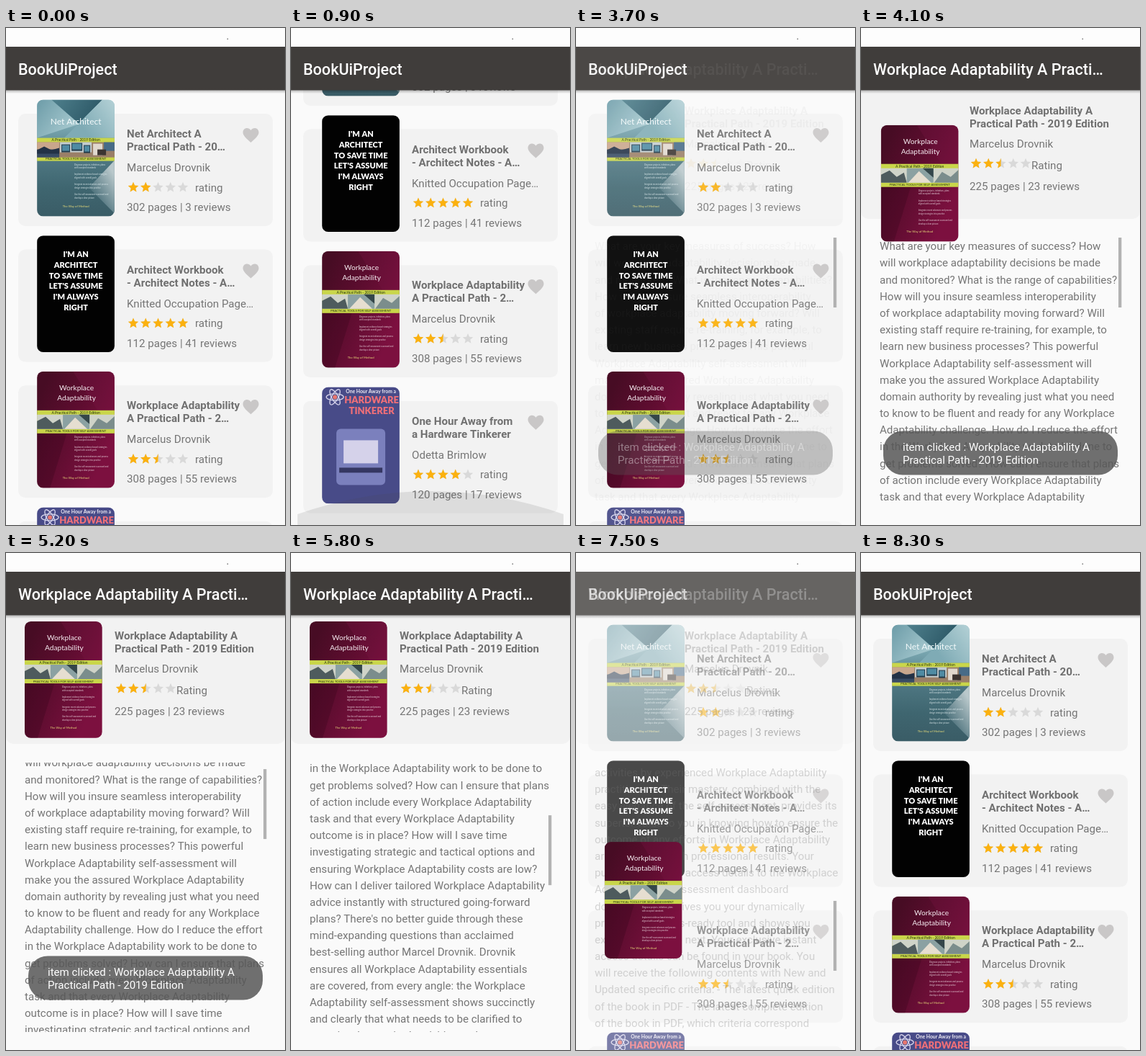
Recreate the animation shown at these times as an HTML page with a canvas. Size 388 by 690 pixels, loop 8400 ms.

```html
<!DOCTYPE html>
<html lang="en">
<head>
<meta charset="utf-8">
<title>BookUiProject</title>
<style>
html, body { margin: 0; width: 100%; height: 100%; overflow: hidden; background: #fafafa; }
canvas { display: block; }
</style>
</head>
<body>
<canvas id="stage" width="388" height="690"></canvas>
<script>
const ctx = document.getElementById('stage').getContext('2d');
const W = 388, H = 690, LOOP = 8400, TOP = 86;
const GRAY = '#757575', CARD = '#f2f2f2', PAGE = '#fafafa';
const BODY = '15.1px Roboto, sans-serif';
const BOLD = 'bold ' + BODY;
const ROW = 188.6, LINE = 23.18, SELECTED = 2;
const COVER_W = 107.8, COVER_H = 161.8;

const books = [
  { title: ['Net Architect A', 'Practical Path - 20…'], author: 'Marcelus Drovnik', stars: 2, info: '302 pages | 3 reviews', cover: tealCover },
  { title: ['Architect Workbook', '- Architect Notes - A…'], author: 'Knitted Occupation Page…', stars: 5, info: '112 pages | 41 reviews', cover: blackCover },
  { title: ['Workplace Adaptability', 'A Practical Path - 2…'], author: 'Marcelus Drovnik', stars: 2.5, info: '308 pages | 55 reviews', cover: maroonCover },
  { title: ['One Hour Away from', 'a Hardware Tinkerer'], author: 'Odetta Brimlow', stars: 4, info: '120 pages | 17 reviews', cover: blueCover }
];

const story = `What are your key measures of success? How
will workplace adaptability decisions be made
and monitored? What is the range of capabilities?
How will you insure seamless interoperability
of workplace adaptability moving forward? Will
existing staff require re-training, for example, to
learn new business processes? This powerful
Workplace Adaptability self-assessment will
make you the assured Workplace Adaptability
domain authority by revealing just what you need
to know to be fluent and ready for any Workplace
Adaptability challenge. How do I reduce the effort
in the Workplace Adaptability work to be done to
get problems solved? How can I ensure that plans
of action include every Workplace Adaptability
task and that every Workplace Adaptability
outcome is in place? How will I save time
investigating strategic and tactical options and
ensuring Workplace Adaptability costs are low?
How can I deliver tailored Workplace Adaptability
advice instantly with structured going-forward
plans? There's no better guide through these
mind-expanding questions than acclaimed
best-selling author Marcel Drovnik. Drovnik
ensures all Workplace Adaptability essentials
are covered, from every angle: the Workplace
Adaptability self-assessment shows succinctly
and clearly that what needs to be clarified to
organize the required activities and processes
so that Workplace Adaptability outcomes are
achieved. Contains extensive criteria grounded
in past and current successful projects and
activities by experienced Workplace Adaptability
practitioners. Their mastery, combined with the
easy elegance of the self-assessment, provides its
superior value to you in knowing how to ensure the
outcome of any efforts in Workplace Adaptability
are maximized with professional results. Your
purchase includes access details to the Workplace
Adaptability self-assessment dashboard
download which gives you your dynamically
prioritized projects-ready tool and shows you
exactly what to do next. Your exclusive instant
access details can be found in your book. You
will receive the following contents with New and
Updated specific criteria: - The latest quick edition
of the book in PDF - The latest complete edition
of the book in PDF, which criteria correspond
to the criteria in the dashboard and more`.split('\n');

// Keyframes as [time, value] pairs, linear in between.
const listScroll = [[400, 0], [500, 30], [800, 167], [1000, 167], [1100, 145], [1300, 40], [1400, 0]];
const bottomGlow = [[700, 0], [800, .7], [900, 1], [1100, 0]];
const topGlow = [[1300, 0], [1400, .6], [1500, 1], [1900, 0]];
const textScroll = [[5100, 0], [5200, 35], [5400, 190], [5600, 278], [5700, 278], [5800, 282], [5900, 330],
  [6000, 410], [6100, 510], [6200, 600], [6300, 665], [6400, 708], [6500, 733], [6600, 740]];
const coverMove = [[3700, 0], [4200, 1], [7000, 1], [7700, 0]];
const pageFade = [[3600, 0], [3700, .06], [4100, 1], [7000, 1], [7700, 0]];
const toastAlpha = [[3600, 0], [3700, .4], [3800, 1], [5400, 1], [5600, 0]];

function track(keys, t) {
  if (t <= keys[0][0]) return keys[0][1];
  for (let i = 1; i < keys.length; i++) {
    const [t0, v0] = keys[i - 1], [t1, v1] = keys[i];
    if (t <= t1) return v0 + (v1 - v0) * (t - t0) / (t1 - t0);
  }
  return keys[keys.length - 1][1];
}
const smooth = p => p * p * (3 - 2 * p);
const mix = (a, b, p) => a + (b - a) * p;

function scoped(draw) { ctx.save(); draw(); ctx.restore(); }
function faded(alpha, draw) { scoped(() => { ctx.globalAlpha = alpha; draw(); }); }
function rect(x, y, w, h, color) { ctx.fillStyle = color; ctx.fillRect(x, y, w, h); }
function poly(color, ...pts) {
  ctx.fillStyle = color;
  ctx.beginPath();
  for (let i = 0; i < pts.length; i += 2) ctx.lineTo(pts[i], pts[i + 1]);
  ctx.fill();
}
function roundPath(x, y, w, h, r) { ctx.beginPath(); ctx.roundRect(x, y, w, h, r); }
function round(x, y, w, h, r, color) { roundPath(x, y, w, h, r); ctx.fillStyle = color; ctx.fill(); }
function clipRect(x, y, w, h) { ctx.beginPath(); ctx.rect(x, y, w, h); ctx.clip(); }
function text(str, x, y, font = BODY, color = GRAY, align = 'left') {
  ctx.font = font; ctx.fillStyle = color; ctx.textAlign = align;
  ctx.fillText(str, x, y);
}
function gradient(x0, y0, x1, y1, ...colors) {
  const g = ctx.createLinearGradient(x0, y0, x1, y1);
  colors.forEach((c, i) => g.addColorStop(i / (colors.length - 1), c));
  return g;
}

function star(cx, cy, color) {
  const pts = [];
  for (let i = 0; i < 10; i++) {
    const a = i * Math.PI / 5 - Math.PI / 2, r = i % 2 ? 3.45 : 7.6;
    pts.push(cx + r * Math.cos(a), cy + .4 + r * Math.sin(a));
  }
  poly(color, ...pts);
}
function rating(x, y, value) {
  for (let i = 0; i < 5; i++) {
    const cx = x + i * 17.25;
    star(cx, y, '#d9d9d9');
    scoped(() => {
      clipRect(cx - 9, y - 9, 18 * Math.min(1, Math.max(0, value - i)), 18);
      star(cx, y, '#fbb10f');
    });
  }
}
function heart(cx, cy) {
  ctx.fillStyle = '#c9c7c7';
  ctx.beginPath();
  ctx.moveTo(cx, cy + 10);
  ctx.bezierCurveTo(cx - 7, cy + 4, cx - 11, cy, cx - 11, cy - 4);
  ctx.bezierCurveTo(cx - 11, cy - 11, cx - 3, cy - 12, cx, cy - 7);
  ctx.bezierCurveTo(cx + 3, cy - 12, cx + 11, cy - 11, cx + 11, cy - 4);
  ctx.bezierCurveTo(cx + 11, cy, cx + 7, cy + 4, cx, cy + 10);
  ctx.fill();
}

// Covers are drawn on a 108 x 162 area.
function guideText(y, color) {
  rect(0, y, 108, 32, '#c9d64a');
  text('A Practical Path - 2019 Edition', 54, y + 4.8, '5px Lato, sans-serif', '#243010', 'center');
  text('PRACTICAL TOOLS FOR SELF-ASSESSMENT', 54, y + 30.6, '4.2px Lato, sans-serif', '#243010', 'center');
  const lines = ['Diagnose projects, initiatives, plans', 'with accepted standards', '',
    'Implement evidence based strategies', 'aligned with overall goals', '',
    'Integrate recent advances and process', 'design strategies into practice', '',
    'Use the self-assessment scorecard and', 'develop a clear picture'];
  lines.forEach((s, i) => text(s, 52, y + 38 + i * 4.6, '2.8px Lato, sans-serif', color));
  text('The Way of Method', 54, 149, '4.2px Lato, sans-serif', '#e8dc7a', 'center');
}
function tealCover() {
  rect(0, 0, 108, 162, gradient(0, 0, 0, 162, '#9dc3ca', '#76a3ad', '#4f7883', '#3f6670', '#3a5c66'));
  poly(gradient(0, 0, 54, 40, '#6d9ca8', '#a9cbd1'), 0, 0, 20, 0, 61, 33, 0, 53);
  poly(gradient(20, 0, 70, 33, '#4f808d', '#2f5b69'), 20, 0, 91, 0, 58, 33);
  poly(gradient(60, 33, 108, 0, '#7fabb5', '#b4d1d6'), 91, 0, 108, 0, 108, 53, 38, 53);
  poly(gradient(76, 125, 108, 105, '#51757f', '#b9c8cb'), 108, 84, 108, 158, 72, 122);
  guideText(53, '#d7e5e8');
  rect(0, 59, 108, 21, '#9a7f68');
  rect(0, 59, 31, 10, '#c9a68c');
  rect(0, 69, 31, 11, '#384b64');
  poly('#233246', 0, 70, 10, 65, 20, 70, 31, 67, 31, 75, 0, 75);
  rect(32, 59, 44, 14, '#c3cdd0');
  [[34, 62, 12], [48, 60, 15], [65, 63, 9]].forEach(([x, y, w]) => {
    rect(x, y, w, 11, '#243b4a'); rect(x + 1, y + 1, w - 2, 8, '#4f8ba3');
  });
  rect(78, 61, 13, 16, '#e0d8ce');
  rect(93, 59, 15, 12, '#476b87');
  rect(84, 69, 12, 8, '#3b3431');
  text('Net Architect', 54, 34, '12px Lato, sans-serif', '#f4fafb', 'center');
}
function blackCover() {
  rect(0, 0, 108, 162, '#020202');
  ["I'M AN", 'ARCHITECT', 'TO SAVE TIME', "LET'S ASSUME", "I'M ALWAYS", 'RIGHT'].forEach((s, i) =>
    text(s, 54, 30 + i * 14.7, '900 11px Lato, sans-serif', '#fff', 'center'));
}
function maroonCover() {
  rect(0, 0, 108, 162, gradient(0, 40, 108, 90, '#470c24', '#5f0d30', '#7c103f'));
  poly('rgba(120,20,66,.3)', 50, 0, 108, 0, 108, 54, 84, 54);
  poly('rgba(45,3,22,.25)', 0, 84, 42, 84, 18, 162, 0, 162);
  guideText(54, '#e3cad5');
  rect(0, 60, 108, 20, '#cfd3c8');
  poly('#4e5b5d', 0, 80, 0, 69, 12, 63, 22, 72, 32, 66, 36, 80);
  rect(36, 60, 37, 20, '#8ba1a2');
  poly('#e6ded0', 38, 80, 53, 64, 70, 80);
  poly('#34464a', 58, 60, 73, 60, 73, 73);
  poly('#7b8d8c', 74, 80, 85, 65, 97, 72, 108, 62, 108, 80);
  text('Workplace', 55, 26, '10.2px Lato, sans-serif', '#f7edf2', 'center');
  text('Adaptability', 55, 40, '10.2px Lato, sans-serif', '#f7edf2', 'center');
}
function blueCover() {
  rect(0, 0, 108, 162, '#484b88');
  ctx.strokeStyle = '#d5d2ea';
  ctx.lineWidth = 1.3;
  for (let i = 0; i < 3; i++) {
    ctx.beginPath();
    ctx.ellipse(18, 14, 12, 4.5, i * Math.PI / 3, 0, 7);
    ctx.stroke();
  }
  ctx.beginPath(); ctx.arc(18, 14, 3, 0, 7); ctx.fillStyle = '#e8776f'; ctx.fill();
  text('One Hour Away from a', 68, 9, 'bold 6.8px Lato, sans-serif', '#f0edf5', 'center');
  text('HARDWARE', 69, 23, '900 13px Lato, sans-serif', '#ef6f78', 'center');
  text('TINKERER', 69, 38, '900 13px Lato, sans-serif', '#ef6f78', 'center');
  round(20, 58, 68, 78, 6, '#7b80bd');
  rect(30, 74, 48, 32, '#d5d2ea');
  rect(24, 112, 60, 7, '#353762');
}
function cover(book, x, y) {
  scoped(() => {
    ctx.translate(x, y);
    roundPath(0, 0, COVER_W, COVER_H, 8.6);
    ctx.clip();
    book.cover();
  });
}

function listItem(book, y, hideCover) {
  round(17, y + 119, 354, 156, 10, CARD);
  if (!hideCover) cover(book, 43.1, y + 99.6);
  book.title.forEach((s, i) => text(s, 168, y + 152 + i * 18, BOLD, '#707070'));
  text(book.author, 168, y + 199);
  rating(177, y + 221, book.stars);
  text('rating', 263, y + 226.5);
  text(book.info, 168, y + 254);
  heart(340.5, y + 149);
}
function glow(amount, bottom) {
  if (!amount) return;
  scoped(() => {
    if (bottom) { ctx.translate(0, H + TOP); ctx.scale(1, -1); }
    ctx.fillStyle = `rgba(70,70,70,${.13 * Math.sqrt(amount)})`;
    ctx.beginPath();
    ctx.moveTo(9, TOP);
    ctx.lineTo(9, TOP + 15 * amount);
    ctx.quadraticCurveTo(194, TOP + 79 * amount, 379, TOP + 15 * amount);
    ctx.lineTo(379, TOP);
    ctx.fill();
  });
}
function listPage(t, hideSelected) {
  const scroll = track(listScroll, t);
  books.forEach((b, i) => listItem(b, i * ROW - scroll, hideSelected && i === SELECTED));
  glow(track(topGlow, t), false);
  glow(track(bottomGlow, t), true);
}

function detailPage(scroll) {
  rect(0, TOP, W, H - TOP, PAGE);
  round(0, TOP, W, 179, [0, 0, 10, 10], CARD);
  text('Workplace Adaptability A', 151, 119.5, BOLD, '#707070');
  text('Practical Path - 2019 Edition', 151, 137.5, BOLD, '#707070');
  text('Marcelus Drovnik', 151, 166);
  rating(160, 188, 2.5);
  text('Rating', 237, 195.5);
  text('225 pages | 23 reviews', 151, 225);
  scoped(() => {
    clipRect(0, 291, W, 374);
    story.forEach((s, i) => text(s, 26, 308.3 + i * LINE - scroll));
  });
}

function header(fade) {
  rect(0, 0, W, 26, '#fdfdfd');
  rect(307.5, 14.5, 1.5, 1.5, '#777');
  rect(0, TOP, W, 5, gradient(0, TOP, 0, TOP + 5, 'rgba(0,0,0,.28)', 'rgba(0,0,0,0)'));
  rect(0, 26, W, 60.4, '#403d3b');
  // The bar pales a little while both pages are half transparent.
  faded(fade * (1 - fade), () => rect(0, 26, W, 60.4, PAGE));
  const font = '500 21.56px Roboto, sans-serif';
  faded(1 - fade, () => text('BookUiProject', 17, 65, font, '#fff'));
  faded(fade, () => text('Workplace Adaptability A Practi…', 17, 65, font, '#fff'));
}

function toast(alpha) {
  faded(alpha, () => {
    round(31, 559.5, 326, 61, 27, 'rgba(88,88,88,.85)');
    text('item clicked : Workplace Adaptability A', 58, 587, BODY, '#fff');
    text('Practical Path - 2019 Edition', 58, 605, BODY, '#fff');
  });
}

function render(t) {
  const move = smooth(track(coverMove, t));
  const fade = track(pageFade, t);
  const scroll = track(textScroll, t);
  rect(0, 0, W, H, PAGE);
  if (fade < 1) listPage(t, fade > 0);
  if (fade > 0) faded(fade, () => detailPage(scroll));
  header(fade);
  if (fade > 0) {
    cover(books[SELECTED], mix(43.1, 25.9, move), mix(99.6 + SELECTED * ROW, 95, move));
    rect(358, 291 + scroll * .2594, 4.3, 97, '#b2b2b2');
  }
  toast(track(toastAlpha, t));
}

const start = performance.now();
function tick() {
  const t = (performance.now() - start) % LOOP;
  render(Math.floor(t / 100) * 100);
  requestAnimationFrame(tick);
}
tick();
</script>
</body>
</html>
```
